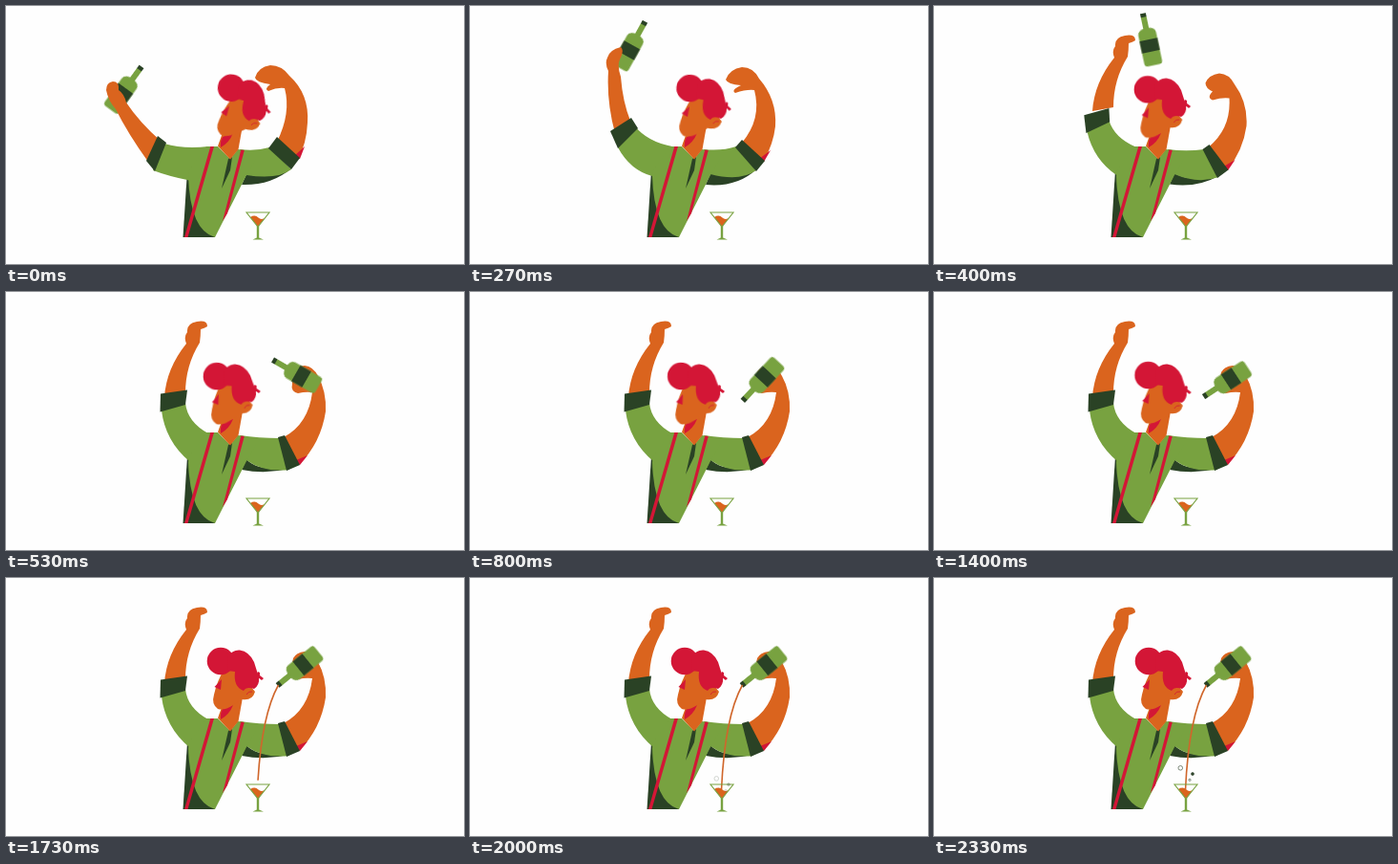
These frames come from a looping animation (480 by 270 pixels, 2.47 s). An HTML page:

```html
<!DOCTYPE html>
<html lang="en">
<head>
<meta charset="utf-8">
<title>Bartender</title>
<style>
  html, body { margin: 0; width: 100%; height: 100%; overflow: hidden; background: #fefefe; }
  svg { display: block; width: 100%; height: 100%; }

  .green { fill: #78a240; }
  .dark { fill: #2a4225; }
  .skin { fill: #da641e; }
  .red { fill: #d31636; }
  .line { fill: none; stroke: #78a240; stroke-width: 1.1; }

  .move { animation: 2470ms linear infinite both; }

  #head { transform-origin: 245px 165px; animation-name: head; animation-timing-function: ease-in-out; }
  @keyframes head {
    0% { transform: translate(-2px, 1px) rotate(9.5deg); animation-timing-function: linear; }
    10.81% { transform: translate(-1px, .5px) rotate(4.8deg); animation-timing-function: ease-out; }
    21.62% { transform: translate(0, 0) rotate(-3deg); }
    26% { transform: translate(0, 0) rotate(-4deg); }
    32.43% { transform: translate(0, 0) rotate(-2.8deg); }
    43.24% { transform: translate(0, 0) rotate(-1.2deg); }
    64%, 100% { transform: translate(0, 0) rotate(0deg); }
  }

  #bottle { animation-name: bottle; }
  @keyframes bottle {
    0% { transform: translate(122px, 91px) rotate(-54deg); }
    10.81% { transform: translate(167px, 46px) rotate(-61deg); }
    13.51% { transform: translate(189px, 40px) rotate(-78deg); }
    16.22% { transform: translate(226px, 41px) rotate(-102deg); }
    18.92% { transform: translate(270px, 58px) rotate(-126deg); }
    21.62% { transform: translate(309px, 88px) rotate(-150deg); animation-timing-function: ease-out; }
    32.43% { transform: translate(309px, 89px) rotate(-227deg); animation-timing-function: ease-in-out; }
    43.24% { transform: translate(311px, 91px) rotate(-202deg); animation-timing-function: ease-in-out; }
    66%, 100% { transform: translate(311px, 91px) rotate(-219deg); }
  }

  #armL { animation-name: armL; }
  @keyframes armL {
    0% { d: path("M163 142Q140 122 126 101Q124 92 118 88Q119 79 112 79Q105 80 105 88Q107 99 115 108Q128 134 149 163Z"); }
    10.81% { d: path("M168 120Q160 100 158 74Q154 62 157 56Q162 46 158 43Q146 46 144 54Q141 60 145 68Q143 100 152 133Z"); animation-timing-function: ease-out; }
    21.62%, 100% { d: path("M188 106Q188 77 203 53Q204 46 204 39Q208 38 211 36Q211 29 200 31Q189 33 190 42Q186 47 189 54Q168 80 166 110Z"); }
  }
  #sleeveL { animation-name: sleeveL; }
  @keyframes sleeveL {
    0% { d: path("M166 144Q186 150 212 147L212 190L190 182Q170 178 154 172Z"); }
    10.81% { d: path("M173 126Q186 142 212 147L212 190L191 178Q168 172 155 148Z"); animation-timing-function: ease-out; }
    21.62%, 100% { d: path("M188 116Q190 136 212 148L212 190L192 177Q167 156 163 124Z"); }
  }
  #cuffL { animation-name: cuffL; }
  @keyframes cuffL {
    0% { d: path("M159 136L168 143L156 173L147 162Z"); }
    10.81% { d: path("M169 117L176 128L155 149L147 131Z"); animation-timing-function: ease-out; }
    21.62%, 100% { d: path("M190 102.5L188 118L161.5 125.5L162 106.5Z"); }
  }

  #armR { animation-name: armR; }
  @keyframes armR {
    0% { d: path("M284 142Q299 112 292 86Q284 85 275 89Q270 87 277 82Q262 80 261 75Q264 64 277 62Q289 62 297 73Q318 92 316 122Q315 144 306 160Z"); }
    10.81% { d: path("M285 143Q306 118 298 88Q290 87 278 91Q273 88 284 83Q270 82 268 77Q272 66 285 64Q297 64 303 76Q322 98 320 126Q318 144 308 162Z"); }
    21.62%, 100% { d: path("M291 152Q317 138 321 105Q314 104 306 106Q298 104 300 96Q299 90 301 84Q304 78 313 77Q322 78 327 88Q336 104 335 125Q330 158 307 181Z"); }
  }
  #foldR { animation-name: foldR; }
  @keyframes foldR {
    0% { d: path("M302 157L313 147L308 160Z"); }
    10.81% { d: path("M303 160L315 151L308 163Z"); }
    21.62%, 100% { d: path("M304 176L316 171L308 181Z"); }
  }
  #sleeveR { animation-name: sleeveR; }
  @keyframes sleeveR {
    0% { d: path("M245 150Q262 152 276 148L299 171Q285 182 252 177L240 185Z"); }
    10.81% { d: path("M245 150Q264 152 279 147L300 172Q283 184 252 176L240 185Z"); }
    21.62%, 100% { d: path("M245 150Q265 153 287 153L297 186Q270 189 252 176L240 185Z"); }
  }
  #shadeR { animation-name: shadeR; }
  @keyframes shadeR {
    0% { d: path("M252 176Q278 182 299 170Q278 188 247 187Z"); }
    10.81% { d: path("M252 175Q274 182 300 171Q280 190 247 187Z"); }
    21.62%, 100% { d: path("M252 175Q262 187 296 185Q272 191 247 186Z"); }
  }
  #cuffR { animation-name: cuffR; }
  @keyframes cuffR {
    0% { d: path("M275 149L284 137L308 159L299 171Z"); }
    10.81% { d: path("M278 148L285 140L309 162L300 173Z"); }
    21.62%, 100% { d: path("M285 152L292 150L308 181L294 187Z"); }
  }

  #stream { fill: none; stroke: #d0662b; stroke-width: 1.6; stroke-dasharray: 100 200; animation-name: pour; }
  @keyframes pour {
    0%, 64.86% { stroke-dashoffset: 101; }
    70.27% { stroke-dashoffset: 9; }
    73%, 100% { stroke-dashoffset: 0; }
  }

  .bubble { stroke: #4a5b47; stroke-width: .7; animation-name: rise; }
  @keyframes rise {
    0%, 80% { opacity: 0; transform: translateY(12px); }
    83% { opacity: 1; }
    94.59%, 100% { opacity: 1; transform: none; }
  }
</style>
</head>
<body>
<svg viewBox="0 0 480 270">
  <!-- right arm -->
  <path id="armR" class="move skin"/>
  <path id="foldR" class="move red"/>

  <!-- torso -->
  <path class="dark" d="M190 172L185.500 242H219V195Z"/>
  <path id="shadeR" class="move dark"/>
  <path id="sleeveR" class="move green"/>
  <path id="cuffR" class="move dark"/>
  <path id="sleeveL" class="move green"/>
  <path class="green" d="M192 172L210 147H222L235 160L243 150L250 151L262 160L252 177L219 242Q193 235 191 178Z"/>
  <path class="dark" d="M233 160L237 158L235 172L226 191Z"/>
  <path class="red" d="M214.300 147H218L190.500 242H187ZM246.300 150.500L249.800 151L232 217L227 225Z"/>

  <!-- neck and head -->
  <path class="skin" d="M228 130L222 146.500L235 160.500L243.500 150L248 125Z"/>
  <path class="red" d="M238 133L227 137Q224 142 225 148Q234 143 238 133Z"/>
  <g id="head" class="move">
    <path class="skin" d="M229 95Q221 108 218 122Q215 132 222 137Q229 139 238 133L247 127Q258 129 261 119L252 108L242 94Z"/>
    <path class="red" d="M226 106L218.500 114L225 117Z"/>
    <circle class="red" cx="225" cy="87" r="14.300"/>
    <path class="red" d="M233 82Q237 75 245 75.500Q255 77 260 88L265 104Q266 112 260 116Q252 113 249 118Q238 114 240 98L232 97Z"/>
    <path class="red" d="M262 102L264 98L266 99L266 102L270 105L268 107L264 104Z"/>
    <path d="M252 122Q254 118 258 119" fill="none" stroke="#d31636" stroke-width=".8"/>
  </g>

  <g id="bottle" class="move">
    <path class="green" d="M-18-9.500H12Q17-9 18-3H33V3H18Q17 9 12 9.500H-18Q-21.500 9.500-21.500 6V-6Q-21.500-9.500-18-9.500Z"/>
    <path class="dark" d="M-7-9.500H6V9.500H-7ZM30-3H34V3H30Z"/>
  </g>

  <!-- left arm -->
  <path id="armL" class="move skin"/>
  <path id="cuffL" class="move dark"/>

  <!-- drink -->
  <path id="stream" class="move" pathLength="100" d="M285.500 112Q267 145 263.500 222"/>
  <path class="skin" d="M256 221Q261 218 264.500 221.500Q267 224 271 222L264 231Z"/>
  <path class="line" d="M252 216H276L264 231Z"/>
  <path class="green" d="M262.800 230H265.200V242.500L270 244.500H258.500L262.800 242.500Z"/>
  <circle class="move bubble" cx="258.300" cy="198.800" r="2.300" fill="none"/>
  <circle class="move bubble dark" cx="271" cy="205" r="1.500"/>
  <circle class="move bubble" cx="268" cy="211.300" r="1.100" fill="none"/>
</svg>
<script>
  // Step the keyframes at 15 pictures a second; the last pose holds twice as long.
  // Step times are rounded to 10 ms, so a step may come slightly early.
  const loop = 2470, steps = 37, step = loop / steps, early = 10;
  const parts = document.getAnimations();
  const start = performance.now();
  parts.forEach(part => part.pause());

  function tick() {
    const time = (performance.now() - start) % loop;
    const pose = Math.min(Math.floor((time + early) / step), steps - 2) * step;
    parts.forEach(part => { part.currentTime = pose; });
    requestAnimationFrame(tick);
  }
  tick();
</script>
</body>
</html>
```
